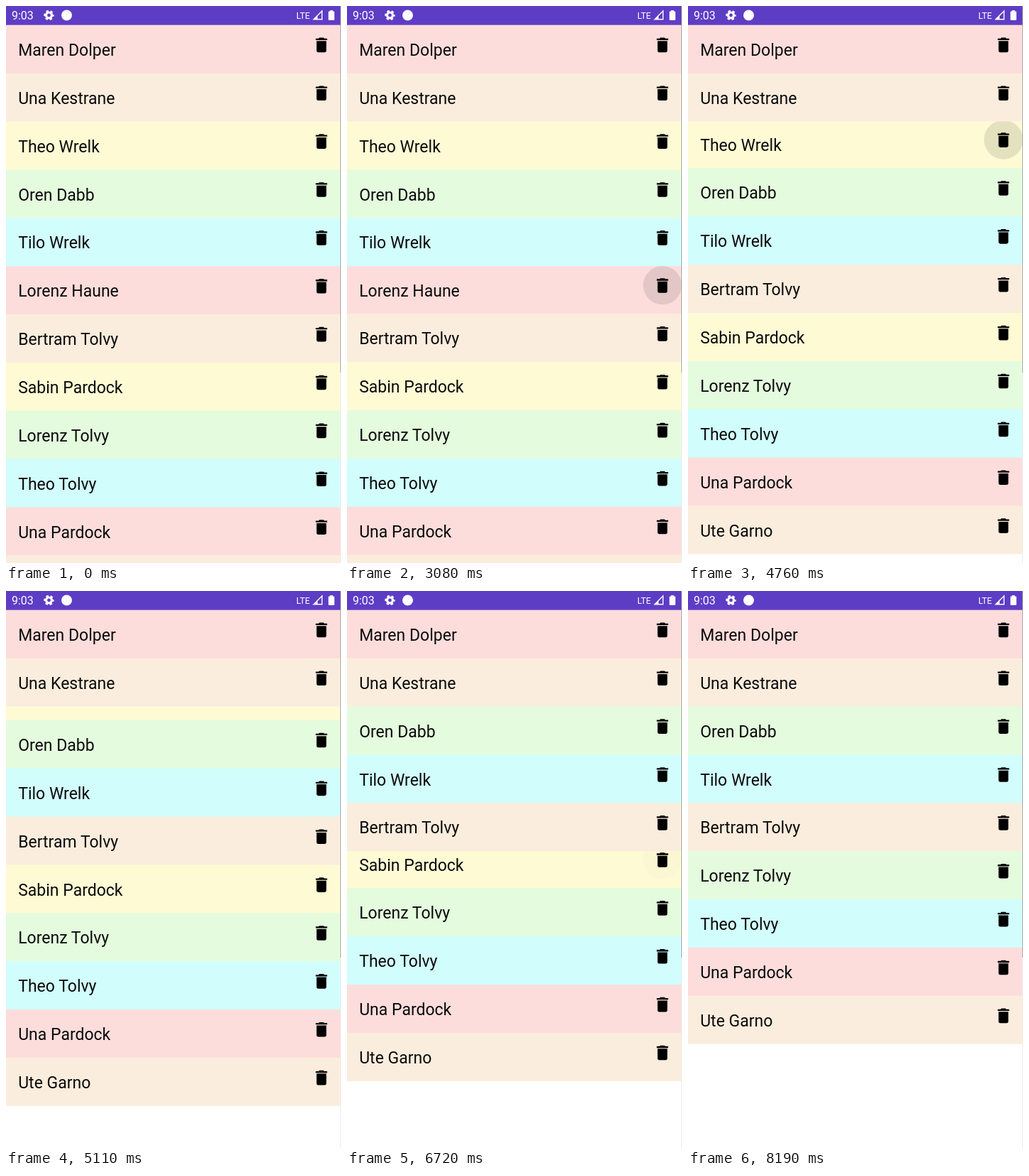
Recreate the animation shown at these times as an HTML page. Size 472 px wide and 784 px high, loop 8.26 s.

```html
<!DOCTYPE html>
<html lang="en">
<head>
<meta charset="utf-8">
<title>Contact list</title>
<style>
  html, body { margin: 0; width: 100%; height: 100%; overflow: hidden; background: #fff; }
  svg { display: block; width: 472px; height: 784px; font-family: Roboto, sans-serif; }
</style>
</head>
<body>
<svg viewBox="0 0 472 784">
  <rect width="472" height="784" fill="#fff"/>
  <g id="list"></g>
  <g id="status" fill="#fff">
    <rect width="471" height="26.7" fill="#5e3dc5"/>
    <text x="8" y="18.7" font-size="16">9:03</text>
    <g fill="none" stroke="#fff">
      <circle cx="60.5" cy="13" r="4" stroke-width="3.2"/>
      <circle cx="60.5" cy="13" r="6" stroke-width="2.4" stroke-dasharray="3.3 2.983" stroke-dashoffset="1.65"/>
    </g>
    <circle cx="85.5" cy="13" r="7.5"/>
    <text x="409" y="17.6" font-size="12.2">LTE</text>
    <path d="M433.5 18.8H445.3V7z" fill="none" stroke="#fff" stroke-width="1.4"/>
    <path d="M433 19l6-6v6z"/>
    <path d="M456.5 6h4v1.5h1.2a1 1 0 0 1 1 1V19a1 1 0 0 1-1 1h-6.400a1 1 0 0 1-1-1V8.500a1 1 0 0 1 1-1h1.200z"/>
  </g>
  <rect x="471" width="1" height="516" fill="#a9a9a9"/>
  <rect x="471" y="516" width="1" height="268" fill="#ececec"/>
</svg>
<script>
const LOOP = 8260, STEP = 70;
const TOP = 26.7, ROW = 67.88;
const SHRINK = 1000, PRESS_LEAD = 110;
const COLORS = ['#fddddc', '#fbeddd', '#fefad4', '#e4fbde', '#d1fdfc'];
const NAMES = ['Maren Dolper', 'Una Kestrane', 'Theo Wrelk', 'Oren Dabb', 'Tilo Wrelk', 'Lorenz Haune',
  'Bertram Tolvy', 'Sabin Pardock', 'Lorenz Tolvy', 'Theo Tolvy', 'Una Pardock', 'Ute Garno'];
const REMOVED_AT = { 5: 3013, 2: 4653, 7: 6472 };
const TRASH = 'M6 19c0 1.1.9 2 2 2h8c1.1 0 2-.9 2-2V7H6v12zM19 4h-3.5l-1-1h-5l-1 1H5v2h14V4z';

const clamp = v => Math.min(1, Math.max(0, v));

// cubic-bezier(.4, 0, .2, 1)
function ease(x) {
  x = clamp(x);
  if (x === 0 || x === 1) return x;
  let lo = 0, hi = 1;
  for (let i = 0; i < 30; i++) {
    const s = (lo + hi) / 2, r = 1 - s;
    if (1.2 * s * r * r + 0.6 * s * s * r + s * s * s < x) lo = s; else hi = s;
  }
  return lo * lo * (3 - 2 * lo);
}

function add(parent, tag, attrs) {
  const el = document.createElementNS('http://www.w3.org/2000/svg', tag);
  for (const key in attrs) el.setAttribute(key, attrs[key]);
  return parent.appendChild(el);
}

const list = document.getElementById('list');

// Earlier rows are painted on top, so a collapsing row slides under its neighbour.
const rows = NAMES.map((name, i) => {
  const group = add(list, 'g', {});
  list.prepend(group);
  add(group, 'rect', { y: -1, width: 471, height: ROW + 1, fill: COLORS[i % COLORS.length] });
  add(group, 'text', { x: 17.2, y: 43.2, 'font-size': 23, fill: '#0a0a0a' }).textContent = name;
  const ripple = add(group, 'circle', { cx: 444.5, cy: 27.8, r: 0, opacity: 0 });
  add(group, 'path', { d: TRASH, transform: 'translate(430.7 14.4) scale(1.147)' });
  return { group, ripple, removedAt: REMOVED_AT[i] ?? Infinity };
});

function drawRipple(ripple, age) {
  const fade = clamp(age / 75) * (1 - clamp((age - 225) / 150));
  ripple.setAttribute('r', 16.5 + 11 * ease(age / 225));
  ripple.setAttribute('opacity', 0.1 * fade);
}

function render(t) {
  let bottom = TOP;
  for (const { group, ripple, removedAt } of rows) {
    const height = ROW * (1 - ease((t - removedAt) / SHRINK));
    bottom += height;
    group.setAttribute('transform', `translate(0 ${bottom - ROW})`);
    group.setAttribute('visibility', height > 0 ? 'visible' : 'hidden');
    drawRipple(ripple, t - removedAt + PRESS_LEAD);
  }
}

const start = performance.now();
function tick() {
  const t = (performance.now() - start) % LOOP;
  render(Math.floor(t / STEP) * STEP);
  requestAnimationFrame(tick);
}
tick();
</script>
</body>
</html>
```
